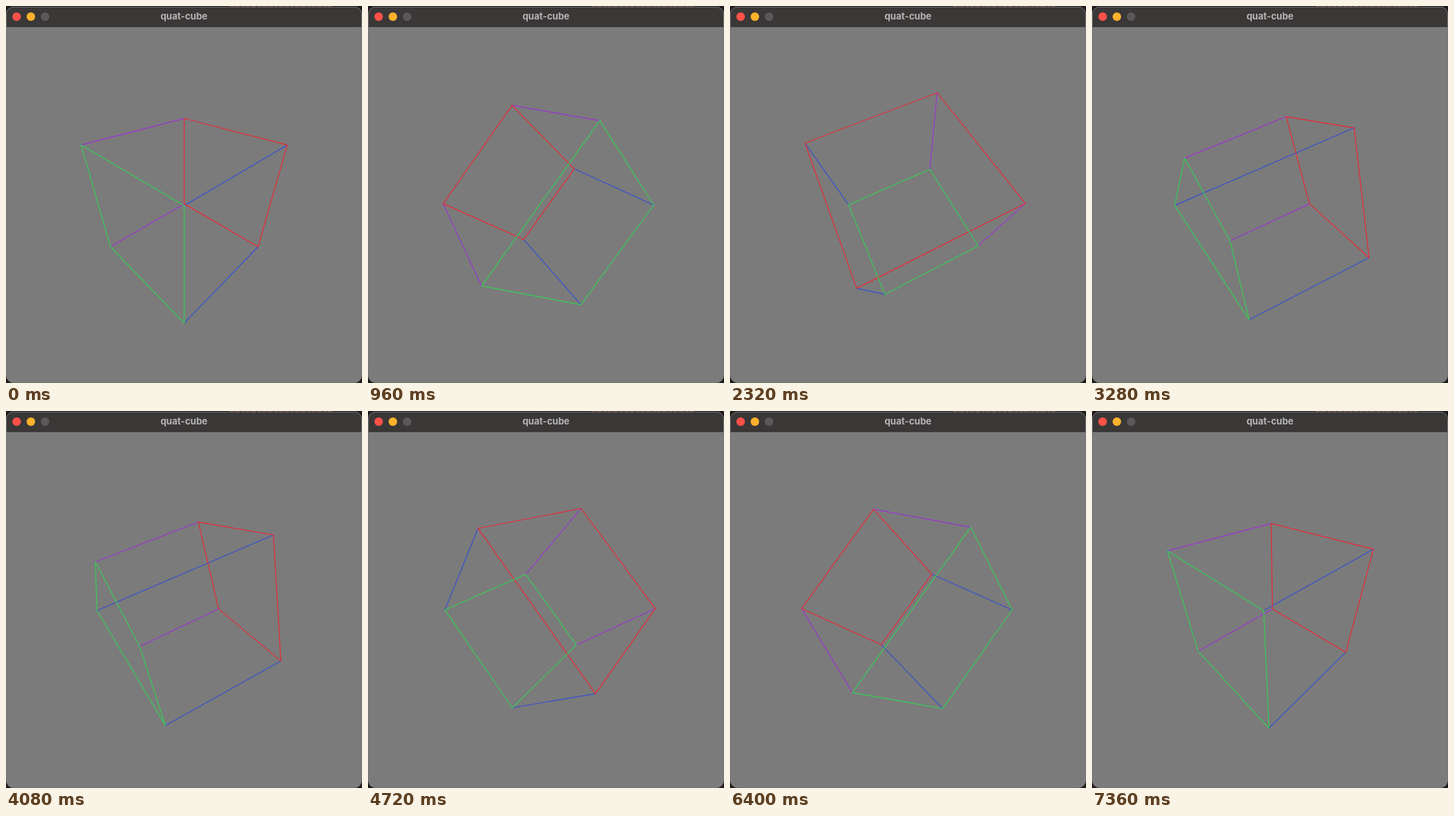
An HTML page for the animation above (7.44 s loop, 501x530 px).

```html
<!DOCTYPE html>
<html lang="en">
<head>
<meta charset="utf-8">
<title>quat-cube</title>
<style>
  html, body { margin: 0; width: 100%; height: 100%; overflow: hidden; background: #1d1b1c; }
  svg { display: block; width: 501px; height: 530px; }
  text { font: 700 13px Inter, "Open Sans", sans-serif; fill: #b7b5b5; text-anchor: middle; }
</style>
</head>
<body>
<svg viewBox="0 0 501 530">
  <defs>
    <clipPath id="window"><rect x="0.5" y="1" width="500" height="528.5" rx="10"/></clipPath>
  </defs>
  <rect width="501" height="530" fill="#1d1b1c"/>
  <path d="M315 0.5H460" stroke="#6b4238" stroke-dasharray="5 2 7 3 4 2"/>
  <g clip-path="url(#window)">
    <rect width="501" height="530" fill="#7b7b7b"/>
    <rect width="501" height="29" fill="#3a3737"/>
    <rect y="28.5" width="501" height="1" fill="#2b2929"/>
  </g>
  <rect x="0.5" y="1.5" width="500" height="528" rx="10" fill="none" stroke="#929090" stroke-opacity="0.6"/>
  <circle cx="15" cy="15" r="6" fill="#fe5148"/>
  <circle cx="35" cy="15" r="6" fill="#fdb22b"/>
  <circle cx="55" cy="15" r="6" fill="#5b5859"/>
  <text x="250.5" y="19">quat-cube</text>
  <g id="cube" fill="none" stroke-width="1.15" stroke-linecap="round"></g>
</svg>
<script>
const STEP = 80, LOOP = 7440;
const CENTER = { x: 250.8, y: 278.8 };
const FOCAL = 301.3, DISTANCE = 3.52, TILT = 0.0063;
const SPEED = 0.1448; // radians per step

// Relative angular velocity: [step, velocity], linear in between.
const velocity = [[0, 0], [2.9, 1], [43.44, 1], [49.04, -1], [90.4, -1], [92.1, 0]];

const edges = [
  ["#9a35d0", [[-1, 1, 1], [-1, 1, -1]], [[-1, -1, 1], [-1, -1, -1]]],
  ["#344fd0", [[1, 1, 1], [1, 1, -1]], [[1, -1, 1], [1, -1, -1]]],
  ["#ec2835", ...face(-1)],
  ["#35cf55", ...face(1)]
];

function face(z) {
  const corners = [[1, 1, z], [1, -1, z], [-1, -1, z], [-1, 1, z]];
  return corners.map((corner, i) => [corner, corners[(i + 1) % 4]]);
}

function angleAt(step) {
  let angle = 0;
  for (let i = 1; i < velocity.length; i++) {
    const [t0, v0] = velocity[i - 1], [t1, v1] = velocity[i];
    const dt = Math.min(step, t1) - t0;
    if (dt <= 0) break;
    const v = v0 + (v1 - v0) * dt / (t1 - t0);
    angle += (v0 + v) / 2 * dt * SPEED;
  }
  return angle;
}

// The camera looks down the cube's diagonal; the cube turns about the camera's up axis.
function project([x, y, z], angle) {
  const right = (x - z) / Math.SQRT2;
  const rise = (2 * y - x - z) / Math.sqrt(6);
  const front = (x + y + z) / Math.sqrt(3);
  const up = rise - TILT * front;
  const near = front + TILT * rise;
  const c = Math.cos(angle), s = Math.sin(angle);
  const scale = FOCAL / (DISTANCE - near * c + right * s);
  const px = CENTER.x + (right * c + near * s) * scale;
  const py = CENTER.y - up * scale;
  return px.toFixed(2) + " " + py.toFixed(2);
}

const cube = document.getElementById("cube");
const paths = edges.map(([color]) => {
  const path = document.createElementNS("http://www.w3.org/2000/svg", "path");
  path.setAttribute("stroke", color);
  return cube.appendChild(path);
});

function draw(ms) {
  const angle = angleAt(Math.floor((ms % LOOP) / STEP));
  edges.forEach(([, ...lines], i) => {
    const d = lines.map(([a, b]) => `M${project(a, angle)}L${project(b, angle)}`);
    paths[i].setAttribute("d", d.join(""));
  });
}

const start = performance.now();
function tick() {
  draw(performance.now() - start);
  requestAnimationFrame(tick);
}
tick();
</script>
</body>
</html>
```
